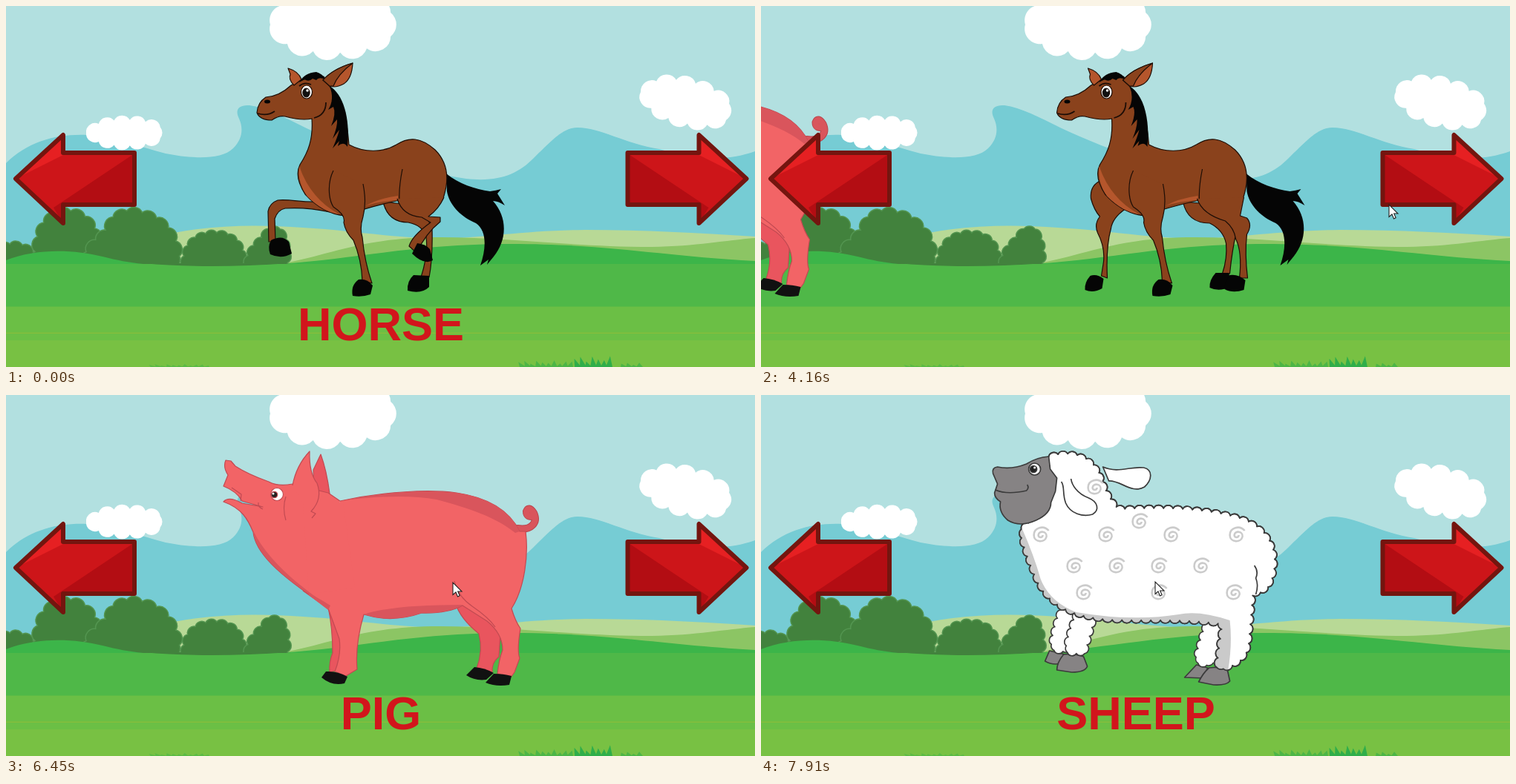
An HTML page for the animation above (7990 ms loop, 1009 px wide and 487 px high).

```html
<!DOCTYPE html>
<html lang="en">
<head>
<meta charset="utf-8">
<title>Farm animals</title>
<style>
  html, body { margin: 0; height: 100%; overflow: hidden; background: #b2e0e0; }
  svg { display: block; width: 100vw; height: 100vh; }
  text { font: bold 63px "Liberation Sans", Arial, sans-serif; fill: #d2151c; text-anchor: middle; }
  .first .b, .second .a { display: none; }
  #horse { fill: #8a421c; stroke: #1c0d06; stroke-width: 1.2; stroke-linejoin: round; }
  #horse .light { fill: #b5562c; }
  #horse .black { fill: #050505; stroke: none; }
  #pig { fill: #f26466; stroke: #c24a52; stroke-width: 1.2; stroke-linejoin: round; }
  #pig .far { fill: #e9555e; }
  #pig .shade { fill: #d9555c; stroke: none; }
  #pig .hoof { fill: #111; stroke: none; }
  #sheep { fill: #fff; stroke: #3b3b3b; stroke-width: 1.7; stroke-linejoin: round; }
  #sheep .grey { fill: #868384; }
  #sheep .shade { fill: #cacaca; stroke: none; }
  .line { fill: none !important; }
</style>
</head>
<body>
<svg viewBox="0 0 1009 487" preserveAspectRatio="none">
  <defs>
    <path id="swirl" class="line" stroke="#cbcbcb" stroke-width="2.6" d="M10-5C3-13-10-9-10 1C-10 11 5 12 7 3C8-4-3-6-4 1C-4 5 2 5 2 1"/>
    <path id="wool" data-bump="13" d="M388 83C420 73 451 83 460 116Q468 140 482 154C540 151 600 152 648 167C688 181 700 215 688 250Q682 268 663 268L657 340Q650 366 614 371L622 309C570 301 520 305 470 303C420 299 394 285 376 258Q358 220 349 183Q370 165 394 140Z"/>
    <clipPath id="woolClip"><use href="#wool"/></clipPath>
    <g id="arrow" stroke-linejoin="round">
      <path fill="#cd1519" d="M13 233L77 174V198H173V268H77V293Z"/>
      <path fill="#e62022" d="M13 233L77 174V201Z"/>
      <path fill="#b30d13" d="M173 199V268H77V293L64 272Z"/>
      <path fill="none" stroke="#74150f" stroke-width="6" d="M13 233L77 174V198H173V268H77V293Z"/>
    </g>
  </defs>

  <!-- scenery -->
  <path fill="#76ccd4" d="M0 212C30 182 70 172 110 174C150 178 180 190 215 199C250 206 290 208 306 192C320 178 319 163 314 152C308 140 313 133 328 134C350 137 375 150 405 165C480 200 560 225 620 233C665 238 690 226 710 206C735 182 750 164 770 164C800 164 835 186 880 193C930 207 970 210 1009 196V330H0Z"/>
  <g fill="#fff">
    <path data-bump="36" d="M356 25A85 38 0 0 1 526 25A85 38 0 0 1 356 25Z"/>
    <path data-bump="22" d="M108 171A54 20 0 0 1 215 171A54 20 0 0 1 108 171Z"/>
    <path data-bump="26" d="M855 116A64 31 14 0 1 979 144A64 31 14 0 1 855 116Z"/>
  </g>
  <path fill="#b8d996" d="M200 312C270 294 340 295 400 299C470 303 520 313 590 314C650 312 700 303 780 302C860 302 930 306 1009 311V350H200Z"/>
  <path fill="#8cc564" d="M370 348C440 335 480 312 585 312C680 312 760 325 870 325C930 324 970 316 1009 313V350H370Z"/>
  <path fill="#3cb549" d="M370 348C480 340 550 321 680 321C810 321 880 337 1009 344V352H370Z"/>
  <g fill="#42823d" stroke="#539550" stroke-width="3" paint-order="stroke">
    <path data-bump="17" d="M-30 352Q-20 322 10 322Q38 322 46 352Z"/>
    <path data-bump="20" d="M40 352Q38 279 80 277Q126 276 130 352Z"/>
    <path data-bump="20" d="M106 352Q104 322 134 309Q142 272 172 278Q232 284 234 352Z"/>
    <path data-bump="15" d="M240 352Q238 307 282 307Q322 307 320 352Z"/>
    <path data-bump="15" d="M324 352Q326 326 344 316Q352 296 366 300Q380 306 379 352Z"/>
  </g>
  <path fill="#4fb848" d="M0 348H1009V406H0Z"/>
  <path fill="#3cb549" d="M0 343C40 327 90 328 130 338C150 343 165 346 185 348H0Z"/>
  <path fill="#42823d" d="M185 347Q270 355 382 347Z"/>
  <path fill="#6bbf45" d="M0 405.500H1009V452H0Z"/>
  <path fill="#78c143" d="M0 451H1009V487H0Z"/>
  <path fill="#85bd3c" d="M0 440.500H1009V442H0Z"/>
  <g id="grass" fill="#2fae4a"></g>

  <!-- horse -->
  <g id="horse">
    <path class="black" d="M593 226C610 240 632 247 652 250Q660 249 667 247L662 253L672 269Q663 263 656 263C676 285 675 316 657 338L648 349L650 342L639 350C647 327 648 303 633 293C612 284 597 268 594 250Z"/>
    <g class="a">
      <path d="M430 263C405 267 385 260 366 262Q355 266 353 277L354 318H363L362 287Q366 275 376 273Q404 271 436 278Z"/>
      <path class="black" d="M357 316Q372 308 381 318L385 334Q371 342 356 335Q352 325 357 316Z"/>
      <path d="M508 264C512 282 522 292 542 292Q562 296 566 312Q569 335 559 366H570Q575 340 574 300L560 270Z"/>
      <path class="black" d="M549 363L570 364L570 379Q560 389 541 384Q540 371 549 363Z"/>
    </g>
    <g class="b">
      <path d="M398 235Q382 242 384 260Q388 275 396 284Q388 294 393 306Q403 325 401 345L398 364L406 367Q404 325 411 300Q413 286 430 274Z"/>
      <path class="black" d="M383 364Q392 361 401 368L399 381Q387 388 376 383Q375 373 383 364Z"/>
      <path d="M508 264C512 284 525 293 544 293Q562 302 566 320Q568 340 561 361H571Q574 330 580 304L575 270Z"/>
      <path class="black" d="M552 360L570 360L572 379Q556 386 544 380Q543 370 552 360Z"/>
    </g>
    <path d="M588 262C596 240 598 214 578 194C559 177 543 176 526 187C508 198 482 198 462 187C460 165 459 138 437 110L428 95Q405 94 384 107Q368 122 350 123Q339 130 338 144Q342 154 358 154Q368 147 376 149Q398 155 412 152C414 180 407 197 396 214C390 226 394 240 403 254Q427 280 456 283Q485 272 530 262"/>
    <path class="light" stroke="none" d="M395 216Q393 240 406 257Q427 278 449 281Q410 260 395 216ZM484 270Q500 260 528 256V262Q503 263 484 270Z"/>
    <path d="M441 222C433 238 434 260 441 271Q458 282 455 292Q457 305 468 316Q479 342 480 371L493 374Q483 345 480 312Q476 300 481 284Q486 265 481 240"/>
    <path class="black" d="M475 369Q486 367 494 377L491 389Q480 393 467 391Q464 377 475 369Z"/>
    <path class="line" d="M534 220Q529 245 530 262"/>
    <g class="a">
      <path d="M527 260Q534 283 560 285L572 292Q547 310 543 324L553 333Q566 306 585 291V285L569 284Q583 274 590 258"/>
      <path class="black" d="M554 320Q565 321 571 328L575 343Q563 350 547 334Z"/>
    </g>
    <g class="b">
      <path d="M527 260Q534 281 565 290Q577 300 579 314Q588 332 584 367H595Q591 335 594 308Q602 295 594 286L585 283L590 258"/>
      <path class="black" d="M571 363Q582 361 592 370L590 383Q575 388 564 382Q564 371 571 363Z"/>
    </g>
    <path class="black" d="M436 108C454 119 464 150 460 190Q455 182 447 189L449 182L440 192Q447 176 449 167L440 179Q447 162 446 153L438 162Q445 145 441 136L434 140Q443 126 436 108ZM395 103Q402 90 418 89Q426 91 430 99Q421 95 418 100L413 98Q408 103 402 99Z"/>
    <path class="light" d="M427 100Q440 85 467 77Q466 98 455 105Q444 111 436 108Z"/>
    <path d="M427 100Q440 85 467 77Q447 92 441 108L436 108Z"/>
    <path class="light" d="M380 84Q394 88 398 99L388 107Q380 99 383 92Z"/>
    <ellipse cx="405" cy="116" rx="7.500" ry="9" fill="#fff"/>
    <ellipse cx="404.500" cy="117" rx="4.600" ry="6" fill="#111"/>
    <circle cx="406" cy="114" r="1.700" fill="#fff" stroke="none"/>
    <path class="line" stroke-width="1.800" d="M395 108Q402 102 411 106M339 145Q352 149 362 142M431 130Q431 147 415 151"/>
    <ellipse class="black" cx="352" cy="129" rx="4" ry="2.500"/>
  </g>

  <!-- pig -->
  <g id="pig">
    <g id="pigBody">
      <path class="line" stroke="#b9464e" stroke-width="10" stroke-linecap="round" d="M689 180C708 183 717 172 711 159Q704 149 701 157Q701 164 708 164"/>
      <path class="line" stroke="#d9555c" stroke-width="8" stroke-linecap="round" d="M689 180C708 183 717 172 711 159Q704 149 701 157Q701 164 708 164"/>
      <path class="far" d="M605 280Q612 302 637 322Q643 345 634 369L655 374Q654 361 664 353L668 290Z"/>
      <path class="hoof" d="M631 367Q645 368 657 375L647 384Q632 386 620 378Z"/>
      <path class="far" d="M434 286Q440 315 440 348Q435 360 436 374L453 370L462 290Z"/>
      <path d="M450 143C510 130 570 127 607 132C648 138 678 155 692 184L700 184C704 215 699 260 681 288Q686 305 693 315Q688 345 692 355L685 374L680 381L662 376Q664 357 669 344Q669 322 648 305L615 284Q595 295 560 294Q520 308 482 296Q470 337 473 370L458 379L443 373Q452 350 449 329L434 288L400 264"/>
      <path class="shade" d="M450 143C530 127 580 129 607 132C648 138 678 155 692 184L686 186C660 165 625 153 580 141Q530 132 450 143ZM482 296Q520 283 616 283Q595 295 560 294Q520 308 482 296ZM400 264Q415 270 437 284L434 290Z"/>
      <path class="hoof" d="M431 373Q446 372 460 380L456 389Q439 393 425 381ZM657 376Q670 376 681 379L678 391Q660 394 646 388Z"/>
      <path class="line" d="M604 251Q609 272 628 285Q650 300 659 313"/>
    </g>
    <g class="a">
      <path class="far" d="M414 101L424 80Q432 102 436 133L415 140Z"/>
      <path d="M450 143L434 132L386 120Q367 124 354 117Q326 107 309 96L303 89L296 88Q292 97 299 108L293 123Q311 130 318 143L346 151L318 146Q300 136 293 144C318 153 326 168 333 185C336 214 371 243 408 269"/>
      <path stroke="none" d="M400 145H454L470 260L408 269Z"/>
      <path class="shade" d="M333 183C336 214 371 243 410 270L425 278Q355 229 333 183Z"/>
      <path d="M386 122Q391 95 409 76Q408 105 419 119Q427 140 411 157L417 160L412 166"/>
      <path class="line" d="M377 137Q372 152 377 169M340 145Q339 151 346 154M304 125L317 134L316 143"/>
      <circle cx="365" cy="134" r="8.500" fill="#fff"/><circle cx="361.500" cy="134.500" r="4.200" fill="#222"/><circle cx="360" cy="133" r="1.500" fill="#fff" stroke="none"/>
    </g>
    <g class="b">
      <path class="far" d="M362 124L367 82L377 98L369 130Z"/>
      <path d="M461 132Q440 121 416 122L362 124Q353 141 338 148Q309 151 286 149L273 145L269 148L272 154L280 165L277 178Q300 181 309 185L332 186Q313 194 293 194L291 200Q319 202 336 214Q352 234 373 239C398 242 416 255 428 269"/>
      <path stroke="none" d="M410 132H464L490 260L428 270L409 253Z"/>
      <path class="shade" d="M343 222Q355 236 373 239C398 242 416 255 430 270L441 279Q410 247 343 222Z"/>
      <path d="M367 123Q369 98 385 76Q398 97 419 120Q419 137 413 148L417 151L414 160"/>
      <path class="line" d="M367 139Q373 161 384 183M331 180Q338 186 347 181M285 177L307 181"/>
      <circle cx="356" cy="156" r="9" fill="#fff"/><circle cx="354" cy="157" r="4.500" fill="#222"/><circle cx="353" cy="155" r="1.500" fill="#fff" stroke="none"/>
    </g>
  </g>

  <!-- sheep -->
  <g id="sheep">
    <path class="grey" d="M389 345L410 350L405 362Q393 365 383 359ZM587 364L602 368L597 382L571 381Z"/>
    <path data-bump="12" d="M404 290H432L416 347L391 344Q392 320 404 290Z"/>
    <path data-bump="12" d="M600 308H627L608 366L585 361Q590 335 600 308Z"/>
    <path class="grey" d="M408 350Q423 348 435 353L440 366Q437 374 419 374L399 371Q399 361 408 350ZM604 368Q619 366 629 372L632 386Q627 392 610 391L590 387Q596 375 604 368Z"/>
    <path data-bump="12" d="M426 292H452L436 350L410 347Q414 322 426 292Z"/>
    <path d="M461 97C482 106 497 96 516 98C529 101 527 115 517 124C500 134 485 115 469 116Z"/>
    <use href="#wool"/>
    <g clip-path="url(#woolClip)">
      <path class="shade" d="M330 180H352Q368 216 377 248Q389 279 425 293Q500 306 563 296Q590 290 632 304Q636 340 628 380H600V320H420L340 260Z"/>
    </g>
    <use href="#wool" class="line"/>
    <path class="line" d="M665 230Q671 238 667 247Q671 257 667 269"/>
    <path class="grey" d="M388 83Q372 84 358 93Q338 101 319 97Q311 98 313 106L319 120L315 132Q315 139 323 144Q320 158 333 169Q349 179 371 169Q391 160 391 145L397 130L399 112L390 100Z"/>
    <path class="line" d="M316 128Q332 135 358 129Q362 125 359 121"/>
    <circle cx="369" cy="100" r="8" fill="#fff"/><circle cx="367.500" cy="100" r="4.500" fill="#222"/><circle cx="369" cy="98" r="1.500" fill="#fff" stroke="none"/>
    <path d="M405 117C410 124 406 133 411 146C417 160 434 165 447 161C457 155 454 144 442 139C426 133 419 121 418 113"/>
    <g id="swirls"></g>
  </g>

  <text id="label" x="505" y="450.500"></text>
  <use href="#arrow"/>
  <use href="#arrow" transform="matrix(-1 0 0 1 1010.500 0)"/>
  <path id="cursor" fill="#fff" stroke="#222" stroke-width="1.100" d="M0 0V16.500L4 13L6.500 19L9.200 17.800L6.700 12H12Z"/>
</svg>
<script>
  const LOOP = 7990, START = 210, STEP = 220 / 3, SLIDE = 1000;
  const TO_PIG = 3905, TO_SHEEP = 6925;
  const el = id => document.getElementById(id);

  // Replaces a smooth clockwise outline by a row of outward bumps.
  function bump(path) {
    const length = path.getTotalLength();
    const count = Math.round(length / path.dataset.bump);
    const r = length / count * 0.56;
    const points = Array.from({ length: count }, (_, i) => {
      const { x, y } = path.getPointAtLength(i / count * length);
      return `${x} ${y}`;
    });
    const arcs = [...points.slice(1), points[0]].map(p => `A${r} ${r} 0 0 1 ${p}`);
    path.setAttribute("d", `M${points[0]}${arcs.join("")}Z`);
  }
  document.querySelectorAll("[data-bump]").forEach(bump);

  function tuft(left, right, height, opacity) {
    let d = "";
    for (let x = left, i = 0; x < right; x += 7, i++) {
      const h = height * (0.75 + 0.25 * Math.sin(i * 2.4));
      const lean = (x - (left + right) / 2) * 0.15;
      d += `M${x} 487L${x + 3 + lean} ${487 - h}L${x + 9} 487Z`;
    }
    el("grass").innerHTML += `<path d="${d}" opacity="${opacity}"/>`;
  }
  tuft(766, 812, 15, 1);
  tuft(692, 756, 9, 0.6);
  tuft(828, 856, 6, 0.6);
  tuft(195, 270, 4, 0.4);

  function swirlRow(y, left, gap, count) {
    for (let i = 0; i < count; i++)
      el("swirls").innerHTML += `<use href="#swirl" x="${left + i * gap}" y="${y}"/>`;
  }
  swirlRow(124, 451, 0, 1);
  swirlRow(188, 378, 88, 4);
  swirlRow(170, 511, 0, 1);
  swirlRow(230, 423, 57, 4);
  swirlRow(266, 436, 101, 3);

  const swing = p => 0.5 - Math.cos(Math.PI * Math.min(1, Math.max(0, p))) / 2;
  const within = (t, from, to) => t >= from && t < to;
  const flipped = (t, ...times) => times.filter(time => t >= time).length % 2 === 1;

  // Each move: start, duration and where the pointer comes to rest.
  const moves = [
    [210, 750, 850, 242], [1020, 730, 557, 270], [3200, 160, 846, 268],
    [4286, 500, 602, 253], [6450, 120, 850, 257], [7380, 500, 531, 252]
  ];
  function cursorAt(t) {
    let x = 690, y = 448;
    for (const [start, duration, toX, toY] of moves) {
      const p = swing((t - start) / duration);
      x += (toX - x) * p;
      y += (toY - y) * p;
    }
    return [x, y];
  }

  function place(id, x, visible, second) {
    el(id).setAttribute("transform", `translate(${x} 0)`);
    el(id).setAttribute("class", second ? "second" : "first");
    el(id).style.display = visible ? "" : "none";
  }

  function labelAt(t) {
    if (t < TO_PIG) return "HORSE";
    if (within(t, TO_PIG + SLIDE - 10, TO_SHEEP)) return "PIG";
    return t > TO_SHEEP + SLIDE - 25 ? "SHEEP" : "";
  }

  function draw(time) {
    const t = time % LOOP;
    // Movement advances in even steps, as a screen recording does.
    const s = Math.max(0, START + STEP * Math.floor((t - START + 8) / STEP));
    const toPig = swing((s - TO_PIG) / SLIDE), toSheep = swing((s - TO_SHEEP) / SLIDE);
    const pigLevel = flipped(t, 5460, 5750, 6060, 6450, 6530);

    place("horse", 688 * toPig, toPig < 0.999, flipped(t, 2530, 2840, 3200));
    place("pig", 688 * (toPig - 1) + 719 * toSheep, toPig > 0 && toSheep < 0.999, pigLevel);
    place("sheep", 726 * (toSheep - 1), toSheep > 0);
    el("pigBody").setAttribute("transform", pigLevel ? "matrix(1.045 0 0 1.045 -9.1 -17.6)" : "");
    el("label").textContent = labelAt(s);
    el("cursor").setAttribute("transform", `translate(${cursorAt(s)})`);
    el("cursor").style.display = t < START ? "none" : "";
  }

  const begin = performance.now();
  function tick() {
    draw(performance.now() - begin);
    requestAnimationFrame(tick);
  }
  tick();
</script>
</body>
</html>
```
